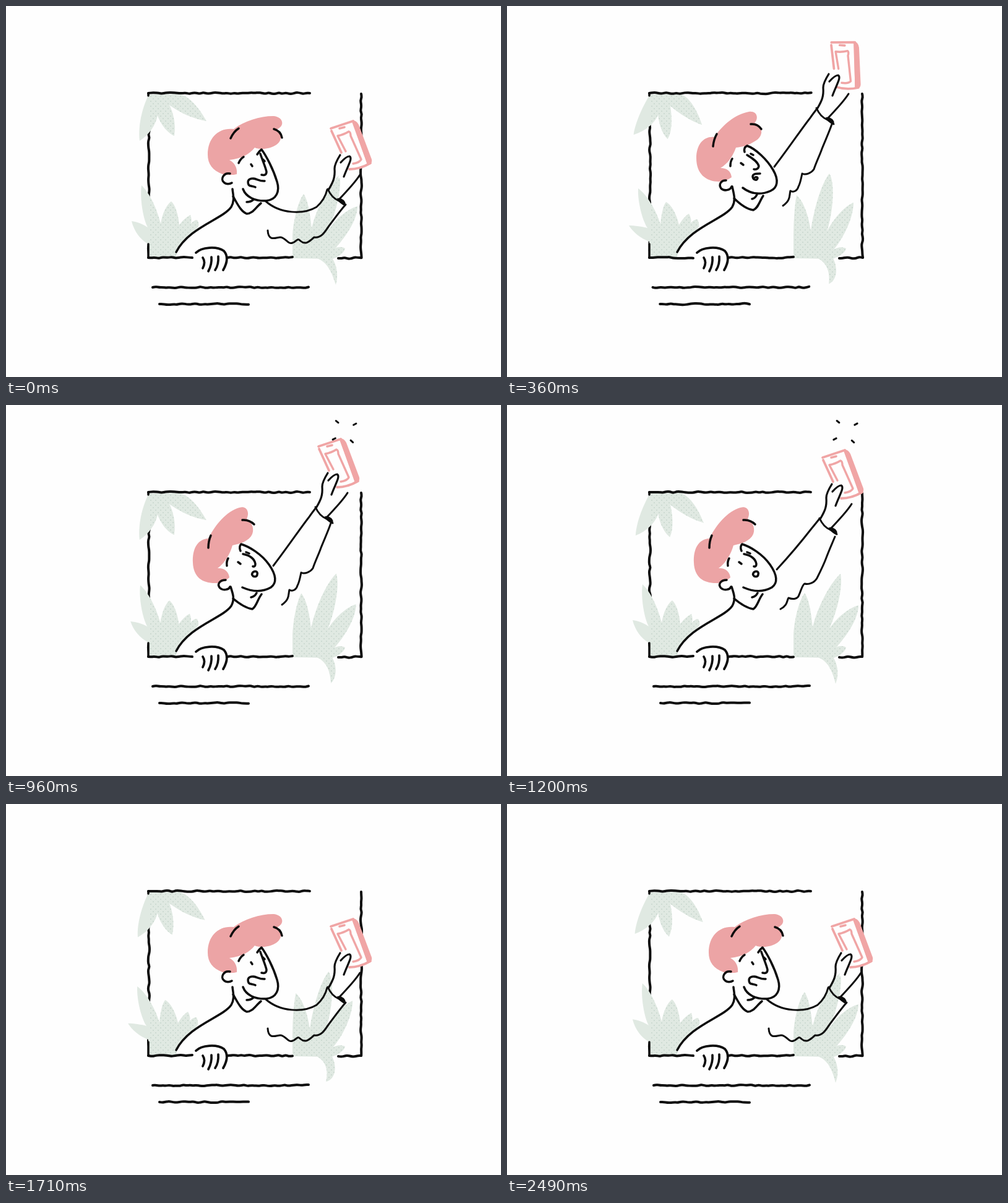
Write an HTML page with a canvas that moves like this. It is 800x600 px and loops after 2.52 s.

```html
<!DOCTYPE html>
<html lang="en">
<head>
<meta charset="utf-8">
<title>Selfie</title>
<style>
html, body { margin: 0; width: 100%; height: 100%; overflow: hidden; background: #fefefe; }
canvas { display: block; width: 800px; height: 600px; }
</style>
</head>
<body>
<canvas id="stage" width="800" height="600"></canvas>
<script>
const ctx = document.getElementById('stage').getContext('2d');
const LOOP = 2520, STEP = 30;
const INK = '#0c0c0c', PAPER = '#fefefe', HAIR = '#eca4a5', PINK = '#f0a5a5', LEAF = '#e0e9e2', DOT = '#bccdc3';

// Head shapes: rest, looking up, fully up, coming back
const head = {
  hair: [
    'M326 240C326 212 345 196 368 199C385 186 410 178 432 178C448 179 452 194 437 200C448 207 447 222 430 228C420 232 408 232 402 229C393 240 380 247 361 249C370 254 374 262 373 272C365 274 358 273 350 272C334 266 326 256 326 240Z',
    'M306 246C306 224 318 210 335 212C348 193 368 175 391 171C405 169 407 183 400 189C415 194 415 212 400 219C391 225 381 228 370 229C365 243 357 255 345 262C355 262 362 267 363 277C357 281 351 283 343 284C321 284 306 271 306 246Z',
    'M302 255C301 233 309 217 327 216C338 194 356 172 377 166C390 162 394 175 389 184C402 193 403 210 390 218C382 224 374 225 366 227C362 241 354 255 342 264C352 263 360 269 361 279C355 284 349 287 341 288C318 289 303 279 302 255Z',
    'M314 243C314 219 328 204 346 205C360 189 380 168 398 161C409 158 413 170 407 180C420 187 423 203 411 212C405 218 396 222 387 223C379 234 367 246 353 255C362 258 367 264 368 274C360 276 354 277 349 277C327 273 314 262 314 243Z'],
  lines: [
    ['M363 214Q368 203 376 198', 'M333 227Q334 216 339 207', 'M327 231Q327 220 331 211', 'M345 220Q347 210 352 203'],
    ['M433 199Q444 202 446 213', 'M394 191Q405 190 411 199', 'M382 186Q393 185 401 193', 'M402 181Q414 181 420 189'],
    ['M406 240Q409 235 413 232C421 243 432 264 438 284C443 300 437 313 421 315C402 316 388 309 383 296',
     'M384 236Q382 229 388 226C402 231 420 248 430 265C440 282 437 294 426 299C410 306 394 304 381 294',
     'M379 236Q376 229 380 225C393 229 413 241 425 258C437 275 438 288 428 295C414 303 398 302 382 295',
     'M396 237Q392 228 395 222C409 232 425 254 434 274C443 294 438 303 424 306C408 309 392 305 382 296'],
    ['M411 239C414 248 420 262 421 268Q421 275 413 273', 'M388 241C398 247 405 252 407 259Q406 265 399 264', 'M383 241C394 243 402 249 403 257Q403 262 399 261', 'M399 240C407 250 412 258 412 264Q411 270 405 268'],
    ['M415 248L418 251', 'M394 239L398 241', 'M388 238L393 240', 'M404 242L408 245'],
    ['M396 256L398 259', 'M378 254L382 257', 'M375 254L379 257', 'M388 254L390 257'],
    ['M376 254Q379 247 384 244', 'M361 259Q361 251 364 247', 'M357 260Q356 253 359 248', 'M367 255Q369 248 373 245'],
    ['M418 283C408 284 402 276 394 280C389 283 391 291 396 291C399 292 402 292 403 293',
     'M409 271C403 271 397 271 397 276C398 282 405 283 405 278C404 276 402 277 401 277',
     'M403 269C398 269 397 274 398 275C400 279 406 278 406 274C407 271 405 269 403 269',
     'M408 276C403 276 402 281 403 283C405 287 411 285 412 281C412 278 410 276 408 276'],
    ['M389 317Q396 317 400 313', 'M396 312Q401 311 404 305', 'M396 311Q402 310 405 304', 'M391 315Q398 314 402 309'],
    ['M362 271C352 269 346 280 352 285C356 289 362 288 365 286', 'M354 282C345 282 342 289 346 295C351 300 361 298 363 292', 'M355 283C346 283 341 289 345 295C350 301 360 299 362 294', 'M358 275C349 275 344 281 348 287C352 292 359 291 363 289'],
    ['M366 296C367 306 370 314 364 325C350 345 295 358 275 398', 'M364 292C367 306 370 314 364 325C350 345 295 358 275 398', 'M363 294C367 306 370 314 364 325C350 345 295 358 275 398', 'M365 295C367 306 370 314 364 325C350 345 295 358 275 398'],
    ['M367 308C373 318 379 332 389 336C399 336 404 325 412 319', 'M367 311C380 324 391 329 398 330C406 327 408 316 414 307', 'M367 313C380 324 391 329 398 330C405 326 406 315 413 306', 'M367 308C373 318 381 331 392 333C401 331 404 320 412 314']
  ]
};

// Arm shapes: low, raised, starting down, nearly low
const arm = {
  sleeve: [
    ['M420 316C443 336 480 338 502 325C512 316 517 306 519 297', 'M432 260C455 230 478 196 490 181C494 175 498 170 501 166', 'M436 266C460 240 478 218 492 200C497 194 501 189 505 184', 'M429 305C455 312 481 313 498 301C509 291 514 281 516 272'],
    ['M423 363C424 382 437 374 443 374C452 374 455 386 463 383C470 381 470 374 476 380C485 388 493 378 498 374C512 376 518 360 524 353C533 341 541 330 549 321',
     'M446 323C459 314 456 306 458 299C463 302 469 299 471 292C474 287 475 280 477 271C483 274 492 270 496 264C500 252 506 240 509 231C515 216 521 203 525 191',
     'M442 330C454 324 452 316 455 312C462 315 470 314 472 307C475 301 477 291 481 289C488 291 497 287 501 280C507 268 512 258 516 247C520 236 525 225 530 213',
     'M427 357C428 371 440 362 447 361C455 362 458 372 465 370C472 367 471 359 477 365C485 371 490 361 496 358C510 359 514 350 522 340C531 325 539 309 545 297']
  ],
  shift: ['20 131', '0 0', '5 18', '17 108']
};

// Leaves: leaning left, leaning right
const leaves = {
  top: [
    'M231 143C222 158 207 185 203 207C222 202 238 190 244 176C245 192 250 208 258 216C267 203 266 180 264 162C278 174 297 187 314 193C308 172 296 148 280 142Z',
    'M231 143C222 160 213 190 216 218C232 208 242 192 245 177C250 192 262 206 272 210C275 190 270 172 264 160C280 172 303 183 324 186C312 165 298 147 280 142Z'],
  left: [
    'M230 407L230 381C216 376 203 365 197 355C205 355 220 357 227 359C218 345 211 315 212 295C226 305 241 330 248 353C249 340 252 323 257 317C267 322 275 340 278 354C283 346 288 339 294 336C297 341 298 346 297 351C300 347 304 345 308 345C311 354 311 356 308 360C294 372 280 388 274 407Z',
    'M230 407L230 385C217 378 207 364 203 348C212 349 222 353 229 358C222 345 216 312 219 290C232 302 244 328 250 352C253 335 259 322 267 316C275 323 279 342 280 354C286 346 292 341 298 338C300 343 300 348 299 352C302 348 306 346 309 346C313 354 312 356 308 360C294 372 280 388 274 407Z'],
  right: [
    'M463 408L463 380C463 355 464 328 468 306C480 316 488 342 491 364C495 335 506 290 521 271C530 285 528 330 517 365C527 345 545 324 560 318C560 338 548 370 528 394C534 390 541 389 548 392C546 400 537 405 526 409Z',
    'M463 408L463 372C464 350 471 318 481 304C489 316 492 340 494 360C500 332 520 290 539 273C543 292 535 330 521 362C532 345 552 328 568 324C568 342 554 368 532 392C537 389 543 389 548 392C546 400 538 405 528 409Z'],
  droop: [
    'M500 407C518 415 521 432 517 449C529 447 538 430 526 406Z',
    'M500 407C520 413 527 432 533 451C537 438 536 420 526 406Z']
};

const ease = {
  lin: u => u,
  in: u => u * u,
  out: u => u * (2 - u),
  soft: u => u * u * (3 - 2 * u)
};

// Keys: [time, value, easing used on the way here]
const keys = {
  head: [[0, 0], [75, 0], [360, 1, 'soft'], [540, 2, 'soft'], [1200, 2], [1440, 3, 'in'], [1650, 0, 'out'], [LOOP, 0]],
  arm: [[0, 0], [80, 0], [345, 1, 'soft'], [1087, 1], [1200, 2, 'in'], [1440, 3], [1577, 0, 'out'], [LOOP, 0]],
  turn: [[0, 0], [80, 0], [330, 18, 'soft'], [360, 18], [540, 0, 'soft'], [LOOP, 0]],
  side: [[0, 1], [360, 0, 'soft'], [660, .3], [1200, 1, 'soft'], [1440, .8], [1740, 0, 'soft'], [2040, .25], [2490, .98, 'soft'], [LOOP, 1]],
  droop: [[0, 1], [360, .2, 'soft'], [660, 0, 'soft'], [1200, .88, 'soft'], [1440, .35], [1740, 0, 'soft'], [2040, .2], [2490, .88, 'soft'], [LOOP, .9]]
};

function span(track, t) {
  let i = 1;
  while (i < track.length - 1 && t >= track[i][0]) i++;
  const [t0, a] = track[i - 1], [t1, b, how = 'lin'] = track[i];
  return { a, b, u: ease[how](Math.min(1, (t - t0) / (t1 - t0))) };
}
function value(track, t) {
  const { a, b, u } = span(track, t);
  return a + (b - a) * u;
}
function morph(p, q, u) {
  const to = q.match(/[\d.]+/g);
  let i = 0;
  return p.replace(/[\d.]+/g, n => (+n + (to[i++] - n) * u).toFixed(2));
}
const pose = (set, s) => morph(set[s.a], set[s.b], s.u);

function stroke(d, width = 3.5, color = INK) {
  ctx.lineWidth = width;
  ctx.strokeStyle = color;
  ctx.stroke(new Path2D(d));
}
function fill(d, color) {
  ctx.fillStyle = color;
  ctx.fill(new Path2D(d));
}

const dots = (() => {
  const tile = document.createElement('canvas');
  tile.width = tile.height = 8;
  const c = tile.getContext('2d');
  c.fillStyle = DOT;
  for (const p of [2, 6]) {
    c.beginPath();
    c.arc(p, p, .85, 0, 7);
    c.fill();
  }
  return ctx.createPattern(tile, 'repeat');
})();

function leaf(set, u, edge = 0) {
  const path = new Path2D(morph(set[0], set[1], u));
  ctx.fillStyle = LEAF;
  ctx.fill(path);
  ctx.save();
  ctx.clip(path);
  ctx.fillStyle = dots;
  ctx.fillRect(edge, 0, 800, 600);
  ctx.restore();
}

function random(seed) {
  return () => {
    seed = (seed * 16807) % 2147483647;
    return seed / 2147483647 - .5;
  };
}
// Hand-drawn straight line whose wobble depends on the seed
function rough(x0, y0, x1, y1, seed) {
  const rnd = random(seed * 7919 + 13), len = Math.hypot(x1 - x0, y1 - y0);
  const n = Math.max(2, Math.round(len / 5.5)), nx = (y0 - y1) / len, ny = (x1 - x0) / len;
  let px = x0, py = y0;
  rnd();
  ctx.strokeStyle = INK;
  ctx.lineWidth = 4;
  ctx.beginPath();
  ctx.moveTo(px, py);
  for (let i = 1; i <= n; i++) {
    const k = rnd() * 2.4, u = i / n;
    const x = x0 + (x1 - x0) * u + nx * k, y = y0 + (y1 - y0) * u + ny * k;
    ctx.quadraticCurveTo(px, py, (px + x) / 2, (py + y) / 2);
    px = x;
    py = y;
  }
  ctx.lineTo(px, py);
  ctx.stroke();
}

function phone(turn) {
  ctx.save();
  ctx.translate(540, 124);
  ctx.rotate(turn * Math.PI / 180);
  ctx.translate(-540, -124);
  fill('M504 69L542 54L550 62L571 120L566 126L541 134L528 117Z', PAPER);
  fill('M539 54Q546 53 550 61L571 117Q573 124 564 126L561 117Z', PINK);
  stroke('M505 67L541 55M506 71L522 106M541 56L565 122M535 133Q552 133 569 123', 3.8, PINK);
  stroke('M519 67L527 65', 3.6, PINK);
  stroke('M529 104L516 79Q526 77 534 72Q537 73 537 79L554 117Q552 122 541 124', 3.4, PINK);
  ctx.restore();
}

function hand() {
  fill('M521 122Q532 110 537 113Q540 118 526 145L517 148Z', PAPER);
  stroke('M520 110C515 118 511 125 511 132C512 146 509 153 502 165', 3.2);
  stroke('M521 122Q530 112 535 112C541 115 532 128 526 145', 3.2);
  stroke('M552 142C544 155 531 168 518 182', 3);
  stroke('M500 165C504 174 510 181 518 184Q523 188 528 191', 3);
  fill('M515 180Q519 188 527 192Q531 189 526 183Q521 179 515 180Z', INK);
}

function sparkle(t) {
  if (t < 630 || t >= 1260) return;
  const far = ease.out(Math.min(1, (t - 605) / 400)), half = 1.2 + 1.2 * far;
  for (const [x, y, slope] of [[-12, -15, .8], [17, -11, -.55], [-17, 13, -.5], [12, 17, .9]]) {
    const k = half / Math.hypot(1, slope), cx = 547 + x * far, cy = 42 + y * far;
    stroke(`M${cx - k} ${cy - k * slope}L${cx + k} ${cy + k * slope}`, 3);
  }
}

function draw(t) {
  const h = span(keys.head, t), a = span(keys.arm, t);
  const boil = Math.floor(t / 120) % 4, dx = boil % 2 ? -1.5 : 0;
  const side = value(keys.side, t), top = .5 + .5 * Math.cos(2 * Math.PI * t / 930);

  ctx.fillStyle = PAPER;
  ctx.fillRect(0, 0, 800, 600);
  ctx.lineCap = ctx.lineJoin = 'round';

  rough(231, 147, 231, 406, 20 + boil);
  rough(574, 142, 574, 407, 30 + boil);
  leaf(leaves.top, top, 231);
  leaf(leaves.left, side, 231);
  fill('M366 300C370 314 370 320 364 325C350 345 295 358 275 398L280 406L420 406L420 330Z', PAPER);
  leaf(leaves.right, side);
  leaf(leaves.droop, value(keys.droop, t));
  stroke('M230 145L230 141M230 385L230 407', 3.5);
  rough(230, 141, 491 - dx / 2, 141, 10 + boil);
  rough(230, 407, 301, 407, 40 + boil);
  rough(358, 407, 463, 407, 50 + boil);
  rough(537, 408, 574, 407, 60 + boil);
  rough(237 + dx, 455, 489 + dx / 2, 455, 70 + boil);
  rough(248 + dx / 2, 482, 392, 482, 80 + boil);

  for (const s of arm.sleeve) stroke(pose(s, a), 3);
  const [x, y] = pose(arm.shift, a).split(' ').map(Number);
  ctx.save();
  ctx.translate(x, y);
  phone(value(keys.turn, t));
  hand();
  ctx.restore();

  fill(pose(head.hair, h), HAIR);
  for (const s of head.lines) stroke(pose(s, h));
  stroke('M307 399C316 390 340 388 352 396C361 406 355 420 351 427', 3.8);
  stroke('M318 407Q323 414 318 424M332 406Q333 418 327 429M343 405Q344 418 338 427', 3.7);
  sparkle(t);
}

const start = performance.now();
function tick() {
  const t = (performance.now() - start) % LOOP;
  draw(Math.floor(t / STEP) * STEP);
  requestAnimationFrame(tick);
}
tick();
</script>
</body>
</html>
```
